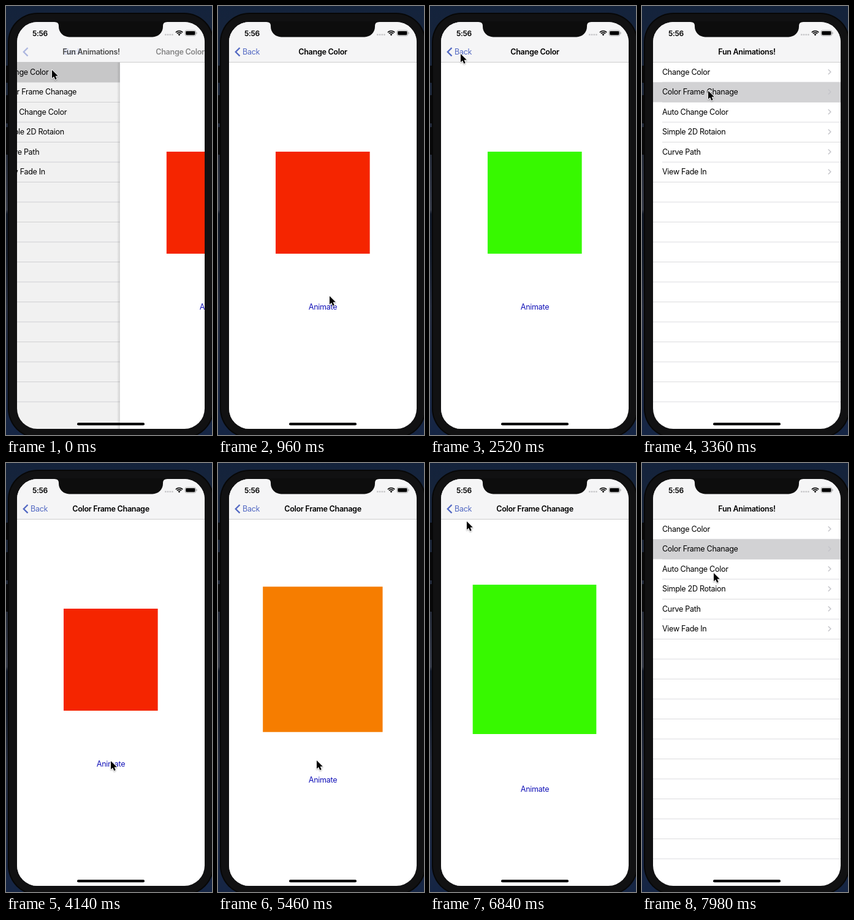
Recreate the animation shown at these times as an HTML page with a canvas. Size 336 px wide and 698 px high, loop 8000 ms.

```html
<!DOCTYPE html>
<html lang="en">
<head>
<meta charset="utf-8">
<title>Fun Animations</title>
<style>
html, body { margin: 0; width: 100%; height: 100%; overflow: hidden; background: #14233c; }
canvas { display: block; width: 336px; height: 698px; }
</style>
</head>
<body>
<canvas id="stage"></canvas>
<script>
const W = 336, H = 698, LOOP = 8000;
const canvas = document.getElementById('stage');
const ratio = window.devicePixelRatio || 1;
canvas.width = W * ratio;
canvas.height = H * ratio;
const ctx = canvas.getContext('2d');

const SCREEN = { x: 18, y: 26, w: 306, h: 662, r: 33 };
const MID = 171, NAV_BOTTOM = 91.5, ROW = 32.5;
const ROWS = ['Change Color', 'Color Frame Chanage', 'Auto Change Color',
  'Simple 2D Rotaion', 'Curve Path', 'View Fade In'];
const RED = [245, 37, 0], ORANGE = [246, 125, 0], GREEN = [55, 249, 0];

// Navigation changes: time, and 1 for push or 0 for pop.
const NAV = [[-82.5, 1], [2560, 0], [3380, 1], [7300, 0]];

// Pointer stops: time, x, y.
const POINTER = [
  [0, 75, 104], [200, 75, 104], [850, 183, 470], [960, 182, 472], [1100, 179, 484],
  [1700, 179, 484], [2380, 50, 78], [2620, 50, 78], [3180, 108, 138], [3440, 108, 138],
  [4040, 171, 485], [4480, 171, 485], [5000, 161, 484], [6260, 161, 484],
  [6840, 60, 95], [7080, 48, 76], [7340, 48, 76], [7900, 117, 179], [8000, 117, 179]
];

// Box poses: time, x, y, width, height, button centre, colour.
const START = [94, 237, 153.6, 166, 489.5, ...RED];
const COLOR_POSES = [
  [1100, ...START],
  [2100, 94, 237, 153.6, 166, 489.5, ...GREEN]
];
const FRAME_POSES = [
  [4440, ...START],
  [5440, 73.2, 201.2, 195.3, 236.5, 515.5, ...ORANGE],
  [6440, 69.7, 198, 201.6, 243, 530.5, ...GREEN]
];

const lerp = (a, b, k) => a + (b - a) * k;
const ease = k => k * k * (3 - 2 * k);

function sample(keys, t) {
  if (t <= keys[0][0]) return keys[0].slice(1);
  for (let i = 1; i < keys.length; i++) {
    const a = keys[i - 1], b = keys[i];
    if (t < b[0]) {
      const k = ease((t - a[0]) / (b[0] - a[0]));
      return a.slice(1).map((v, j) => lerp(v, b[j + 1], k));
    }
  }
  return keys[keys.length - 1].slice(1);
}

// Critically damped spring from 0 to 1.
function spring(ms) {
  const x = ms * 0.0183;
  return x > 10 ? 1 : 1 - (1 + x) * Math.exp(-x);
}

function pushAmount(t) {
  const [start, target] = NAV.filter(n => n[0] <= t).pop();
  const k = spring(t - start);
  return target ? k : 1 - k;
}

function fill(color, x, y, w, h) {
  ctx.fillStyle = color;
  ctx.fillRect(x, y, w, h);
}

function round(color, x, y, w, h, r) {
  ctx.fillStyle = color;
  ctx.beginPath();
  ctx.roundRect(x, y, w, h, r);
  ctx.fill();
}

function text(str, x, y, color, { weight = 400, align = 'left', size = 12.56, alpha = 1 } = {}) {
  ctx.save();
  ctx.globalAlpha = alpha;
  ctx.font = `${weight} ${size}px Inter, sans-serif`;
  ctx.letterSpacing = '-0.3px';
  ctx.textAlign = align;
  ctx.fillStyle = color;
  ctx.fillText(str, x, y + 4.5);
  ctx.restore();
}

function line(points, color, width) {
  ctx.strokeStyle = color;
  ctx.lineWidth = width;
  ctx.beginPath();
  points.forEach(([x, y]) => ctx.lineTo(x, y));
  ctx.stroke();
}

function drawDesk() {
  const g = ctx.createLinearGradient(0, 0, 0, H);
  [[0, '#14233c'], [0.14, '#182439'], [0.36, '#262c3a'], [0.475, '#363b49'], [0.485, '#101827'],
   [0.58, '#151d2c'], [0.7, '#272e40'], [0.9, '#1b2844'], [1, '#152544']]
    .forEach(([at, c]) => g.addColorStop(at, c));
  fill(g, 0, 0, W, H);
}

function drawPhone() {
  [[97, 28], [145, 46], [197, 45]].forEach(([y, h]) => round('#080809', 0, y, 6, h, 1));
  round('#070707', 3, 11, 336, 692, 48);
  round('#111112', 5, 13, 332, 688, 46);
}

function drawNotch() {
  ctx.fillStyle = '#0d0d0d';
  ctx.beginPath();
  ctx.moveTo(79, 25);
  ctx.lineTo(79, 26);
  ctx.quadraticCurveTo(86, 26, 86, 32);
  ctx.arcTo(86, 50.4, 104, 50.4, 17);
  ctx.arcTo(256, 50.4, 256, 32, 17);
  ctx.lineTo(256, 32);
  ctx.quadraticCurveTo(256, 26, 263, 26);
  ctx.lineTo(263, 25);
  ctx.fill();
}

function drawStatus() {
  text('5:56', 43, 44, '#000', { weight: 600, size: 12 });
  for (let i = 0; i < 4; i++) round('#c4c4c6', 259 + i * 3.7, 45.5, 2.6, 2.3, 0.6);
  ctx.strokeStyle = ctx.fillStyle = '#000';
  ctx.lineWidth = 1.7;
  [4.7, 7.5].forEach(r => {
    ctx.beginPath();
    ctx.arc(282.5, 48, r, -Math.PI * 0.77, -Math.PI * 0.23);
    ctx.stroke();
  });
  ctx.beginPath();
  ctx.moveTo(282.5, 48.4);
  ctx.arc(282.5, 48, 2.5, -Math.PI * 0.77, -Math.PI * 0.23);
  ctx.fill();
  ctx.strokeStyle = '#999';
  ctx.lineWidth = 0.8;
  ctx.beginPath();
  ctx.roundRect(292, 39.8, 17.6, 8.6, 2.4);
  ctx.stroke();
  round('#000', 293.2, 41, 15.2, 6.2, 1.4);
  round('#999', 310.4, 42.6, 1.1, 3, 0.5);
}

function drawList(selected, p) {
  const { x, y, w, h } = SCREEN;
  const shift = -0.3 * w * p;
  ctx.save();
  ctx.translate(shift, 0);
  fill('#fff', x, y, w, h);
  for (let i = 0; i < 17; i++) {
    const bottom = NAV_BOTTOM + ROW * (i + 1);
    const left = i < 5 ? 33 : x;
    fill('#d3d3d6', left, bottom - 0.4, x + w - left, 0.8);
  }
  fill('#d2d2d4', x, NAV_BOTTOM + ROW * selected, w, ROW);
  ROWS.forEach((label, i) => {
    const mid = NAV_BOTTOM + ROW * (i + 0.5) - 0.5;
    text(label, 33, mid, '#000');
    line([[303.8, mid - 4], [307.8, mid], [303.8, mid + 4]], '#c5c5ca', 1.5);
  });
  ctx.restore();
  fill(`rgba(0,0,0,${0.125 * p})`, x, y, w, h);
}

function drawDetail(t, p) {
  const { x, y, w, h } = SCREEN;
  const shift = w * (1 - p);
  const [bx, by, bw, bh, button, ...rgb] = sample(t < 3000 ? COLOR_POSES : FRAME_POSES, t);
  ctx.save();
  ctx.translate(shift, 0);
  if (p < 1) {
    const g = ctx.createLinearGradient(x - 5, 0, x, 0);
    g.addColorStop(0, 'rgba(0,0,0,0)');
    g.addColorStop(1, 'rgba(0,0,0,0.14)');
    fill(g, x - 5, y, 5, h);
  }
  fill('#fff', x, y, w, h);
  fill(`rgb(${rgb.map(Math.round)})`, bx, by, bw, bh);
  text('Animate', MID, button, '#1212b8', { align: 'center' });
  ctx.restore();
}

function drawNav(title, p) {
  const { x, y, w } = SCREEN;
  fill('#f5f5f6', x, y, w, NAV_BOTTOM - y);
  fill('#c2c2c4', x, NAV_BOTTOM - 0.5, w, 0.8);
  const heading = { weight: 600, align: 'center' };
  const blue = '#5369c3';
  text('Back', 40 + 100 * (1 - p), 74.5, blue, { alpha: p ** 1.4 });
  text('Fun Animations!', MID - 71 * p, 74.5, '#000', { ...heading, alpha: 1 - p ** 1.5 });
  text(title, MID + 206 * (1 - p), 74.5, '#000', { ...heading, alpha: p });
  ctx.save();
  ctx.globalAlpha = p;
  line([[35.5, 68], [28.8, 74.7], [35.5, 81.4]], blue, 2.3);
  ctx.restore();
}

function drawPointer(x, y) {
  ctx.save();
  ctx.translate(x, y);
  ctx.beginPath();
  [[0, 0], [0, 13.6], [3.1, 10.8], [5.3, 15.8], [7.7, 14.8], [5.6, 9.8], [9.8, 9.8]]
    .forEach(([px, py]) => ctx.lineTo(px, py));
  ctx.closePath();
  ctx.lineJoin = 'round';
  ctx.shadowColor = 'rgba(0,0,0,0.3)';
  ctx.shadowBlur = 2 * ratio;
  ctx.shadowOffsetY = ratio;
  ctx.strokeStyle = '#fff';
  ctx.lineWidth = 1.8;
  ctx.stroke();
  ctx.shadowColor = 'transparent';
  ctx.fillStyle = '#000';
  ctx.fill();
  ctx.restore();
}

function draw(t) {
  const p = pushAmount(t);
  const { x, y, w, h, r } = SCREEN;
  ctx.setTransform(ratio, 0, 0, ratio, 0, 0);
  drawDesk();
  drawPhone();
  ctx.save();
  ctx.beginPath();
  ctx.roundRect(x, y, w, h, r);
  ctx.clip();
  drawList(t < 3300 ? 0 : 1, p);
  if (p > 0) drawDetail(t, p);
  drawNav(ROWS[t < 3000 ? 0 : 1], p);
  drawStatus();
  round('#000', 116, 678, 110, 4.3, 2.1);
  ctx.restore();
  drawNotch();
  drawPointer(...sample(POINTER, t));
}

const began = performance.now();
function tick() {
  draw((performance.now() - began) % LOOP);
  requestAnimationFrame(tick);
}
tick();
</script>
</body>
</html>
```
